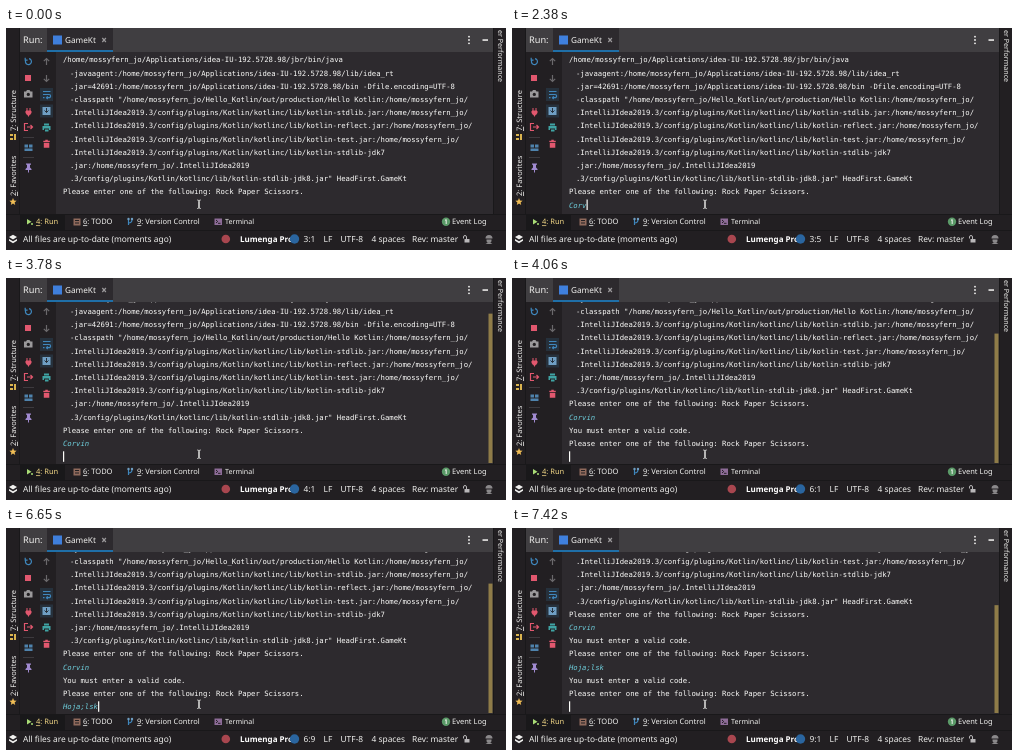
Animation of 500 by 222 pixels, one loop 8000 ms. Source, as an HTML page:

```html
<!DOCTYPE html>
<html lang="en">
<head>
<meta charset="utf-8">
<title>Run console</title>
<style>
  html, body { margin: 0; width: 100%; height: 100%; overflow: hidden; background: #221f22; }
  svg { display: block; width: 500px; height: 222px; text-rendering: geometricPrecision; }
  text { fill: #f0f0ee; font: 7.5px "Noto Sans", "Open Sans", sans-serif; white-space: pre; }
  .head { font-size: 9.2px; }
  .tab { font-size: 8.2px; }
  .info { font-size: 8.4px; }
  .theme { font-size: 8px; font-weight: 700; fill: #fff; text-anchor: middle; }
  .small { font-size: 7.1px; }
  .active { fill: #f0d585; }
  .u { text-decoration: underline; }
  #console text { fill: #fcfcfa; font: 7.28px "DejaVu Sans Mono", "Liberation Mono", monospace; }
  #console .input { fill: #6fd0de; font-style: italic; }
  .line { fill: none; stroke: #9b999b; stroke-width: 1.2; }
  .dim { stroke: #6b696c; }
  .red { stroke: #e2586f; }
  .blue { stroke: #3f87bd; }
</style>
</head>
<body>
<svg viewBox="0 0 500 222">
  <defs>
    <clipPath id="view"><rect x="50" y="24" width="437" height="161.5"/></clipPath>
  </defs>

  <rect width="500" height="222" fill="#221f22"/>
  <rect x="50" y="24" width="437" height="162" fill="#2d2a2e"/>

  <g id="console" clip-path="url(#view)">
    <g id="rows"></g>
    <rect id="caret" width="1.2" height="10.5" fill="#fcfcfa"/>
  </g>
  <rect id="thumb" x="482.5" width="4" fill="#8f7c48"/>

  <!-- header -->
  <rect x="14" width="474" height="24" fill="#403e41"/>
  <rect x="41" width="66" height="24" fill="#2d2a2e"/>
  <rect x="41" y="22" width="66" height="2" fill="#1f6fa8"/>
  <text class="head" x="17" y="15">Run:</text>
  <rect x="47" y="7.5" width="9" height="9" fill="#3f7fdc"/>
  <text class="tab" x="59" y="15">GameKt</text>
  <path class="line" d="M96.300 10l3.600 4m0-4l-3.600 4"/>
  <g fill="#f4f4f2">
    <circle cx="463" cy="8.700" r=".9"/><circle cx="463" cy="12" r=".9"/><circle cx="463" cy="15.300" r=".9"/>
    <rect x="476.500" y="11.300" width="5.500" height="1.500"/>
  </g>

  <!-- side stripes -->
  <path d="M13.5 0V186M487.5 0V186M0 186.5H500M0 202.5H500" stroke="#19181a"/>
  <text transform="translate(10 103) rotate(-90)"><tspan class="u">7</tspan>: Structure</text>
  <path d="M4 106h3v2H4zm0 4h3v2H4zm4-4h2v6H8z" fill="#d9b44f"/>
  <text transform="translate(10 168) rotate(-90)"><tspan class="u">2</tspan>: Favorites</text>
  <path d="M7 170l1 2.500 2.600.2-2 1.700.6 2.600L7 175.600 4.800 177l.6-2.600-2-1.700 2.600-.2z" fill="#f0bd55"/>
  <text class="small" transform="translate(491.500 2) rotate(90)">er Performance</text>

  <!-- run toolbar -->
  <path d="M17 109.500H28M17 129.500H28" stroke="#3d3a3e"/>
  <path class="line blue" d="M20 31.800a3 3 0 1 0 3-1.200M19.200 29.800v2.400h2.400"/>
  <rect x="19" y="47" width="6" height="6" fill="#e2586f"/>
  <path d="M18 63.500h2l1-1.500h2.500l1 1.500h2v6h-8.500z" fill="#9b999b"/>
  <circle cx="22.300" cy="66.400" r="1.600" fill="#221f22"/>
  <path d="M20 83h5v2l-1.500 2h-2L20 85zM21 80v3M24 80v3M22.500 87v1.500" fill="#e2586f" class="red"/>
  <path class="line red" d="M22 95.500h-3.500v7H22M21 99h5.500m-2-2l2 2-2 2"/>
  <path d="M18.500 116.500h3.500v3h-3.500zm4.500 0h3.500v3H23zm-4.500 4h8v2.500h-8z" fill="#4f83ad"/>
  <path d="M20 135.500h5v1l-1 .5v2.500l1.500 1.500v1h-6v-1L21 139.500V137l-1-.5zM22 142h1v2.500h-1z" fill="#a08ad0"/>
  <path class="line dim" d="M40.500 37v-6.500m-2.700 2.700l2.700-2.700 2.700 2.700M40.500 47v6.500m-2.700-2.700l2.700 2.700 2.700-2.700"/>
  <path d="M34 60h13v13H34zM34 76.500h13v13H34z" fill="#26313c"/>
  <path class="line blue" d="M37 63.500h7.500M37 66.500h6a1.600 1.600 0 0 1 0 3.200h-2.500m1.200-1.300l-1.200 1.300 1.200 1.300M37 69.700h1.500"/>
  <rect x="36.500" y="79" width="8" height="8" fill="#6f9fc4"/>
  <path d="M40.500 80v4.500m-2-2l2 2 2-2" fill="none" stroke="#26313c"/>
  <path d="M38 95.500h5v2h-5zm-1.500 2.500h8v4h-1.500v-1.500h-5v1.500h-1.500zm2.500 3.500h3.500v2H39z" fill="#3fa3a3"/>
  <path d="M37.300 112.800h2v-1h2.500v1h2v1.200h-6.500zm.5 2h5.500v5h-5.500z" fill="#e2586f"/>

  <!-- tool window bar -->
  <rect x="14" y="187" width="45" height="15" fill="#19181a"/>
  <path d="M21 191l4.500 2.700-4.500 2.700z" fill="#a9dc76"/>
  <circle cx="26" cy="196" r="1" fill="#a9dc76"/>
  <text class="active" x="30" y="196.300"><tspan class="u">4</tspan>: Run</text>
  <rect x="67.500" y="190.500" width="7" height="7" fill="#8f6a5c"/>
  <path d="M69 192.500h4M69 195h4" stroke="#221f22"/>
  <text x="77" y="196.300"><tspan class="u">6</tspan>: TODO</text>
  <path class="line blue" d="M122.500 197v-6m0 4c2.500 0 3.500-1 3.500-3.500"/>
  <circle cx="122.500" cy="191" r="1.200" fill="#6f9fc4"/><circle cx="126" cy="191" r="1.200" fill="#6f9fc4"/>
  <text x="131" y="196.300"><tspan class="u">9</tspan>: Version Control</text>
  <rect x="208.500" y="190.500" width="7.500" height="6.500" fill="#8d6c98"/>
  <path d="M210 192l1.700 1.500-1.700 1.500M212 195.300h2.500" fill="none" stroke="#221f22"/>
  <text class="small" x="219" y="196.300">Terminal</text>
  <circle cx="440" cy="193.700" r="4.200" fill="#5b9a68"/>
  <path d="M439 192.500l1.200-1v4.500" fill="none" stroke="#f0f0ee"/>
  <text x="446" y="196.300">Event Log</text>

  <!-- status bar -->
  <path d="M7 206.800l4 2.300-4 2.300-4-2.300zM3 211l4 2.300 4-2.300v1.800l-4 2.400-4-2.400z" fill="#f0f0ee"/>
  <text class="info" x="17" y="214">All files are up-to-date (moments ago)</text>
  <circle cx="219.800" cy="211" r="4.300" fill="#a8464f"/>
  <text class="theme" x="260.500" y="214">Lumenga Pro</text>
  <circle cx="288.500" cy="211" r="4.700" fill="#2a659f"/>
  <text class="info" id="pos" x="297.500" y="214"></text>
  <text class="info" x="317.500" y="214">LF</text>
  <text class="info" x="334.500" y="214">UTF-8</text>
  <text class="info" x="365.500" y="214">4 spaces</text>
  <text class="info" x="406" y="214">Rev: master</text>
  <path d="M458.500 211h5v3.500h-5z" fill="#b9b7b9"/>
  <path d="M457.500 210.500v-1.500a1.500 1.500 0 0 1 3 0v2" fill="none" stroke="#b9b7b9"/>
  <path d="M479.500 210.500a3.500 3.500 0 0 1 7 0zM480.500 211.500h5v1a2.500 2.500 0 0 1-5 0zM479.500 216c.5-1.500 6.500-1.500 7 0z" fill="#8b898b"/>

  <!-- mouse pointer -->
  <path d="M191.300 172q1.700 0 1.700 1.300v5.900q0 1.300-1.700 1.300M194.700 172q-1.700 0-1.700 1.300v5.900q0 1.300 1.700 1.300" fill="none" stroke="#e4e4e2"/>
</svg>

<script>
const LOOP = 8000, PITCH = 13.2, BASE = 34.3, LEFT = 57, WRAP = 64, CHAR = 7.28 * 0.602;
const VIEW_TOP = 25, VIEW_H = 160;
const home = "/home/mossyfern_jo/";
const idea = home + "Applications/idea-IU-192.5728.98/";
const lib = "/config/plugins/Kotlin/kotlinc/lib/kotlin-";
const prompt = "Please enter one of the following: Rock Paper Scissors.";
const error = "You must enter a valid code.";

// Times at which each key, the Enter key and the reply arrive
const inputs = [
  { text: "Corvin", keys: [1610, 1820, 2100, 2310, 3080, 3360], enter: 3780, reply: 4060 },
  { text: "Hoja;lsk", keys: [5460, 5740, 6160, 6230, 6300, 6510, 6580, 6650], enter: 7140, reply: 7350 }
];
const caretOff = [[0, 490], [1050, 1470], [4900, 5250]];

const wrapped = [
  `-javaagent:${idea}lib/idea_rt`,
  `.jar=42691:${idea}bin -Dfile.encoding=UTF-8`,
  `-classpath "${home}Hello_Kotlin/out/production/Hello Kotlin:${home}`,
  `.IntelliJIdea2019.3${lib}stdlib.jar:${home}`,
  `.IntelliJIdea2019.3${lib}reflect.jar:${home}`,
  `.IntelliJIdea2019.3${lib}test.jar:${home}`,
  `.IntelliJIdea2019.3${lib}stdlib-jdk7`,
  `.jar:${home}.IntelliJIdea2019`,
  `.3${lib}stdlib-jdk8.jar" HeadFirst.GameKt`
];

const $ = id => document.getElementById(id);
const rows = $("rows"), caret = $("caret"), thumb = $("thumb"), pos = $("pos");
let count = 0;

function set(el, attrs) {
  for (const name in attrs) el.setAttribute(name, attrs[name]);
}

function show(el, on) {
  el.setAttribute("visibility", on ? "visible" : "hidden");
}

function addRow(text, x = LEFT, cls = "") {
  const el = document.createElementNS("http://www.w3.org/2000/svg", "text");
  set(el, { x, y: BASE + PITCH * count++, class: cls });
  el.textContent = text;
  rows.append(el);
  return el;
}

addRow(idea + "jbr/bin/java");
wrapped.forEach(text => addRow(text, WRAP));
addRow(prompt);
const firstInput = count;
for (const input of inputs) {
  input.row = addRow("", LEFT, "input");
  input.replies = [addRow(error), addRow(prompt)];
}

function draw(t) {
  let line = firstInput, column = 0;
  for (const { text, keys, enter, reply, row, replies } of inputs) {
    const typed = keys.filter(k => k <= t).length;
    row.textContent = text.slice(0, typed);
    if (t < enter) column += typed;
    else line += t < reply ? 1 : 3;
    replies.forEach(r => show(r, t >= reply));
  }

  const scroll = Math.max(0, (line - firstInput) * PITCH - 1.8);
  set(rows, { transform: `translate(0 ${-scroll})` });
  set(caret, { x: LEFT + column * CHAR, y: BASE + line * PITCH - scroll - 8 });
  show(caret, !caretOff.some(([a, b]) => t >= a && t < b));

  const ratio = VIEW_H / (VIEW_H + scroll);
  set(thumb, { y: VIEW_TOP + scroll * ratio, height: VIEW_H * ratio });
  show(thumb, scroll > 0);
  pos.textContent = `${line - 8}:${column + 1}`;
}

const start = performance.now();
function tick() {
  draw((performance.now() - start) % LOOP);
  requestAnimationFrame(tick);
}
tick();
</script>
</body>
</html>
```
